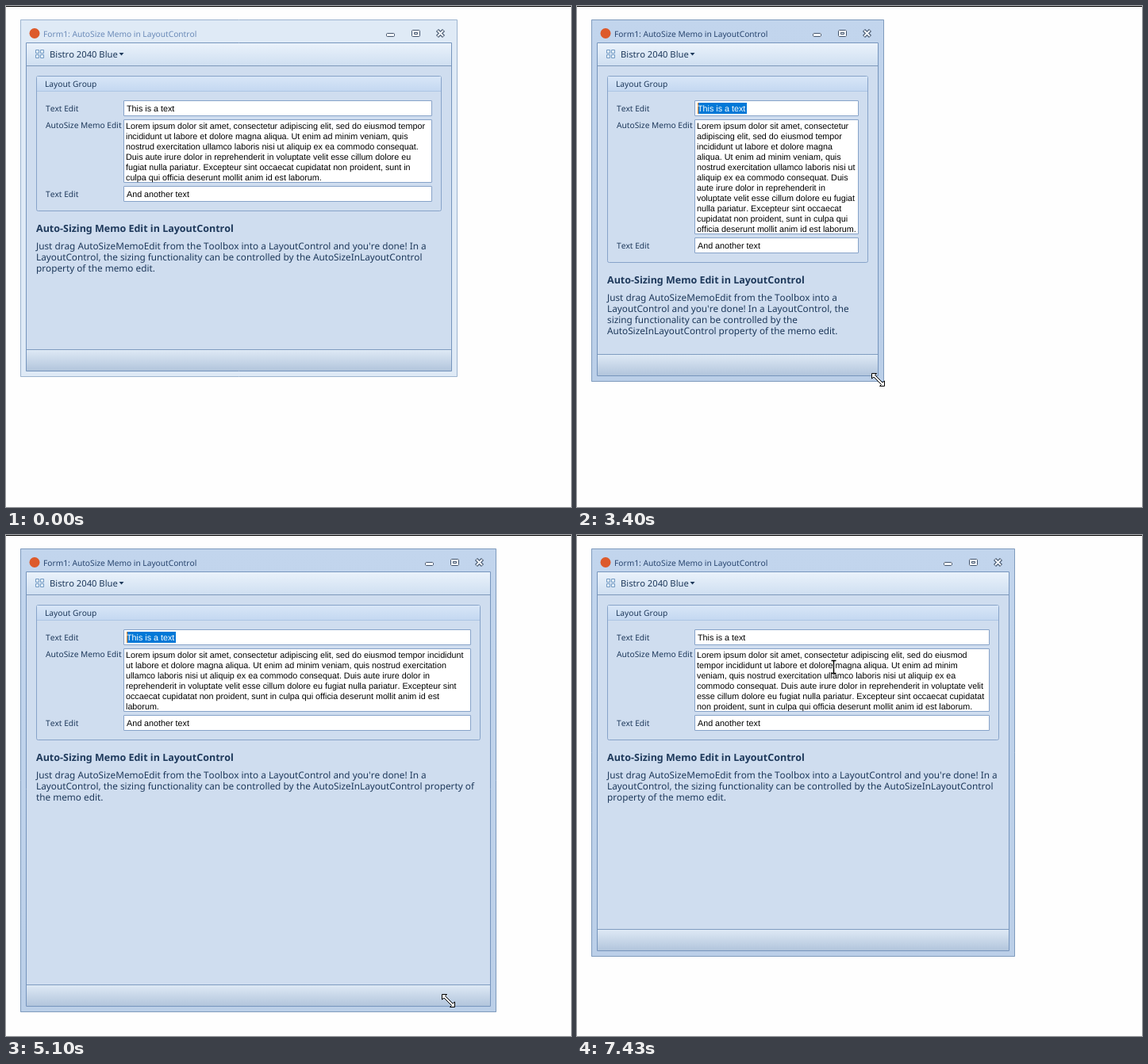
Animation, 712 px wide and 632 px high, one loop 8 s. Source, as an HTML page with a canvas:

```html
<!DOCTYPE html>
<html lang="en">
<head>
<meta charset="utf-8">
<title>Auto-sizing memo</title>
<style>
html, body { margin: 0; width: 100%; height: 100%; overflow: hidden; background: #fefefe; }
canvas { display: block; }
</style>
</head>
<body>
<canvas id="stage" width="712" height="632"></canvas>
<script>
const g = document.getElementById('stage').getContext('2d');
const LOOP = 8000, STEP = 10, LAG = 80;
const INK = '#1e395b', LINE = '#87a3c9', GLYPH = '#45566e', PALE = '#f4f8fd';
const LABEL = '10.2px "Noto Sans", sans-serif';
const BUTTON = '11.2px "Noto Sans", sans-serif';
const HEADING = 'bold 12.5px "Noto Sans", sans-serif';
const BODY = '11.78px "Noto Sans", sans-serif';
const EDIT = '10.75px "Liberation Sans", Arial, sans-serif';
const TITLE = 'Form1: AutoSize Memo in LayoutControl';
const MEMO = 'Lorem ipsum dolor sit amet, consectetur adipiscing elit, sed do eiusmod tempor incididunt ut labore et dolore magna aliqua. Ut enim ad minim veniam, quis nostrud exercitation ullamco laboris nisi ut aliquip ex ea commodo consequat. Duis aute irure dolor in reprehenderit in voluptate velit esse cillum dolore eu fugiat nulla pariatur. Excepteur sint occaecat cupidatat non proident, sunt in culpa qui officia deserunt mollit anim id est laborum.';
const ABOUT = "Just drag AutoSizeMemoEdit from the Toolbox into a LayoutControl and you're done! In a LayoutControl, the sizing functionality can be controlled by the AutoSizeInLayoutControl property of the memo edit.";

// Pointer moves: begin, end, target. It rests in between.
const ENTRY = { x: 697, y: 634 };
const MOVES = [
  [700, 1130, 569, 465], [1360, 1500, 561, 465],
  [2400, 2760, 462, 461], [2760, 3130, 379, 471],
  [3400, 4300, 619, 539], [4430, 4960, 623, 602],
  [5000, 5380, 374, 544], [5380, 5460, 324, 542], [5460, 5800, 257, 537],
  [6100, 6280, 327, 526], [6280, 6360, 423, 518], [6360, 6860, 544, 529],
  [6960, 7430, 323, 166]
];

function pointerAt(t) {
  let { x, y } = ENTRY;
  for (const [begin, end, toX, toY] of MOVES) {
    const u = Math.min(Math.max((t - begin) / (end - begin), 0), 1);
    x += (toX - x) * u;
    y += (toY - y) * u;
  }
  return { x: Math.round(x), y: Math.round(y) };
}

// Lines of words that fit the width in the current font.
function wrap(text, width) {
  const lines = [];
  let line = '';
  for (const word of text.split(' ')) {
    const longer = line ? line + ' ' + word : word;
    if (line && g.measureText(longer).width > width) {
      lines.push(line);
      line = word;
    } else line = longer;
  }
  return [...lines, line];
}

function shorten(text, width) {
  if (g.measureText(text).width <= width) return text;
  while (text && g.measureText(text + '...').width > width) text = text.slice(0, -1);
  return text + '...';
}

function write(text, x, y, font, color = INK) {
  g.font = font;
  g.fillStyle = color;
  g.fillText(text, x, y);
}
function rect(x, y, w, h, color) {
  g.fillStyle = color;
  g.fillRect(x, y, w, h);
}
function shade(x, y, w, h, top, bottom) {
  const fill = g.createLinearGradient(0, y, 0, y + h);
  fill.addColorStop(0, top);
  fill.addColorStop(1, bottom);
  rect(x, y, w, h, fill);
}
function outline(x, y, w, h, color, radius = 0) {
  g.strokeStyle = color;
  g.lineWidth = 1;
  g.beginPath();
  g.roundRect(x + .5, y + .5, w - 1, h - 1, radius);
  g.stroke();
}
function box(x, y, w, h, fill, border, radius) {
  rect(x, y, w, h, fill);
  outline(x, y, w, h, border, radius);
}

function windowButtons(R) {
  box(R - 90, 34, 11, 5, PALE, GLYPH, 1);
  box(R - 58, 30, 11, 9, PALE, GLYPH, 1);
  box(R - 55, 33, 5, 3, PALE, GLYPH);
  const x = R - 21.5, y = 34.5;
  for (const [width, color, k] of [[4.4, GLYPH, 4], [2, PALE, 3.5]]) {
    g.lineWidth = width;
    g.strokeStyle = color;
    g.beginPath();
    for (const s of [-1, 1]) {
      g.moveTo(x - k, y - k * s);
      g.lineTo(x + k, y + k * s);
    }
    g.stroke();
  }
}

function titleBar(R, active) {
  g.fillStyle = '#dd5a2b';
  g.beginPath();
  g.arc(36, 34.5, 6.5, 0, 7);
  g.fill();
  g.font = LABEL;
  write(shorten(TITLE, R - 149), 47, 39, LABEL, active ? '#27446e' : '#6a8ab8');
  windowButtons(R);
}

function toolBar(R) {
  shade(26, 47, R - 34, 28, '#eaf2fb', '#cfdff1');
  rect(26, 75, R - 34, 1, '#7e98ba');
  for (const x of [37, 43]) for (const y of [55, 61]) box(x, y, 5, 5, '#e8f3fc', '#7199c2');
  write('Bistro 2040 Blue', 55, 65, BUTTON);
  g.beginPath();
  g.moveTo(142.5, 59);
  g.lineTo(148.5, 59);
  g.lineTo(145.5, 62.5);
  g.fill();
}

function content(R, B, selected) {
  const right = R - 32, status = B - 35;
  g.font = EDIT;
  const lines = wrap(MEMO, right - 153);
  const end = 145 + lines.length * 13;

  outline(38, 88, R - 58, end - 52, LINE, 2);
  shade(39, 89, R - 60, 18, '#d8e6f7', '#c4d8f1');
  rect(39, 107, R - 60, 1, '#adc5e4');
  write('Layout Group', 49, 102, LABEL);
  write('Text Edit', 50, 133, LABEL);
  write('AutoSize Memo Edit', 50, 154, LABEL);
  write('Text Edit', 50, end + 18, LABEL);

  for (const [top, height] of [[119, 20], [143, end - 143], [end + 4, 20]])
    box(148, top, right - 148, height, '#fff', LINE);
  if (selected) {
    rect(152, 122, 62, 14, '#0078d7');
    rect(152, 122, 1, 14, '#ff8728');
  }
  write('This is a text', 152, 133, EDIT, selected ? '#fff' : '#000');
  write('And another text', 152, end + 18, EDIT, '#000');
  lines.forEach((line, i) => write(line, 151, 155 + i * 13, EDIT, '#000'));

  write('Auto-Sizing Memo Edit in LayoutControl', 38, end + 62, HEADING);
  g.font = BODY;
  wrap(ABOUT, R - 57.5).forEach((line, i) => {
    const y = end + 84 + i * 14;
    if (y + 3 <= status) write(line, 38, y, BODY);
  });
}

function form(R, B, active, selected) {
  const w = R - 18, h = B - 17;
  if (active) shade(18, 17, w, h, '#c2d5ed', '#bbcfe8');
  else rect(18, 17, w, h, '#dfeaf6');
  outline(18, 17, w, h, active ? '#7f9bbd' : '#9db4cf');
  rect(25, 46, R - 32, B - 53, '#cfddef');
  titleBar(R, active);
  toolBar(R);
  g.save();
  g.beginPath();
  g.rect(26, 76, R - 34, B - 111);
  g.clip();
  content(R, B, selected);
  g.restore();
  rect(26, B - 35, R - 34, 1, '#7f9cc0');
  shade(26, B - 34, R - 34, 26, '#dee9f5', '#b2c5dc');
  outline(25, 46, R - 32, B - 53, '#7695bd');
}

const ARROW = [[0, 0], [0, 16], [4, 12.5], [6.5, 18], [9, 17], [6.5, 11.5], [11.5, 11.5]];
const HEAD = [[-5.5, -3.5], [-8, -1.5], [-8, -8], [-2, -8], [-4, -6]];
const RESIZE = [...HEAD, ...HEAD.map(([x, y]) => [-x, -y])];

function cursor(t, R) {
  const { x, y } = pointerAt(t);
  const overEdit = x > 148 && x < R - 32 && y > 143 && y < 247;
  g.save();
  g.translate(x + .5, y + .5);
  g.strokeStyle = '#000';
  g.lineWidth = 1;
  g.beginPath();
  if (t > 7000 && overEdit) {
    g.lineWidth = 1.4;
    for (const end of [-8, 8]) {
      g.moveTo(-3, end);
      g.lineTo(3, end);
      g.moveTo(0, 0);
      g.lineTo(0, end);
    }
  } else {
    const shape = t < 1480 || t > 7000 ? ARROW : RESIZE;
    shape.forEach(p => g.lineTo(...p));
    g.closePath();
    g.fillStyle = '#fff';
    g.fill();
  }
  g.stroke();
  g.restore();
}

function draw(time) {
  const t = Math.floor(time % LOOP / STEP) * STEP;
  // The window corner trails the pointer during the drag.
  const grip = pointerAt(Math.min(Math.max(t - LAG, 2400), 6900));
  const R = grip.x + 8, B = grip.y + 3;
  const active = t >= 1860;
  g.textRendering = 'geometricPrecision';
  g.fontKerning = 'none';
  rect(0, 0, 712, 632, '#fefefe');
  rect(0, 0, 712, 1, '#000');
  form(R, B, active, active && t < 7400);
  if (t >= 700) cursor(t, R);
}

const start = performance.now();
(function tick() {
  draw(performance.now() - start);
  requestAnimationFrame(tick);
})();
</script>
</body>
</html>
```
